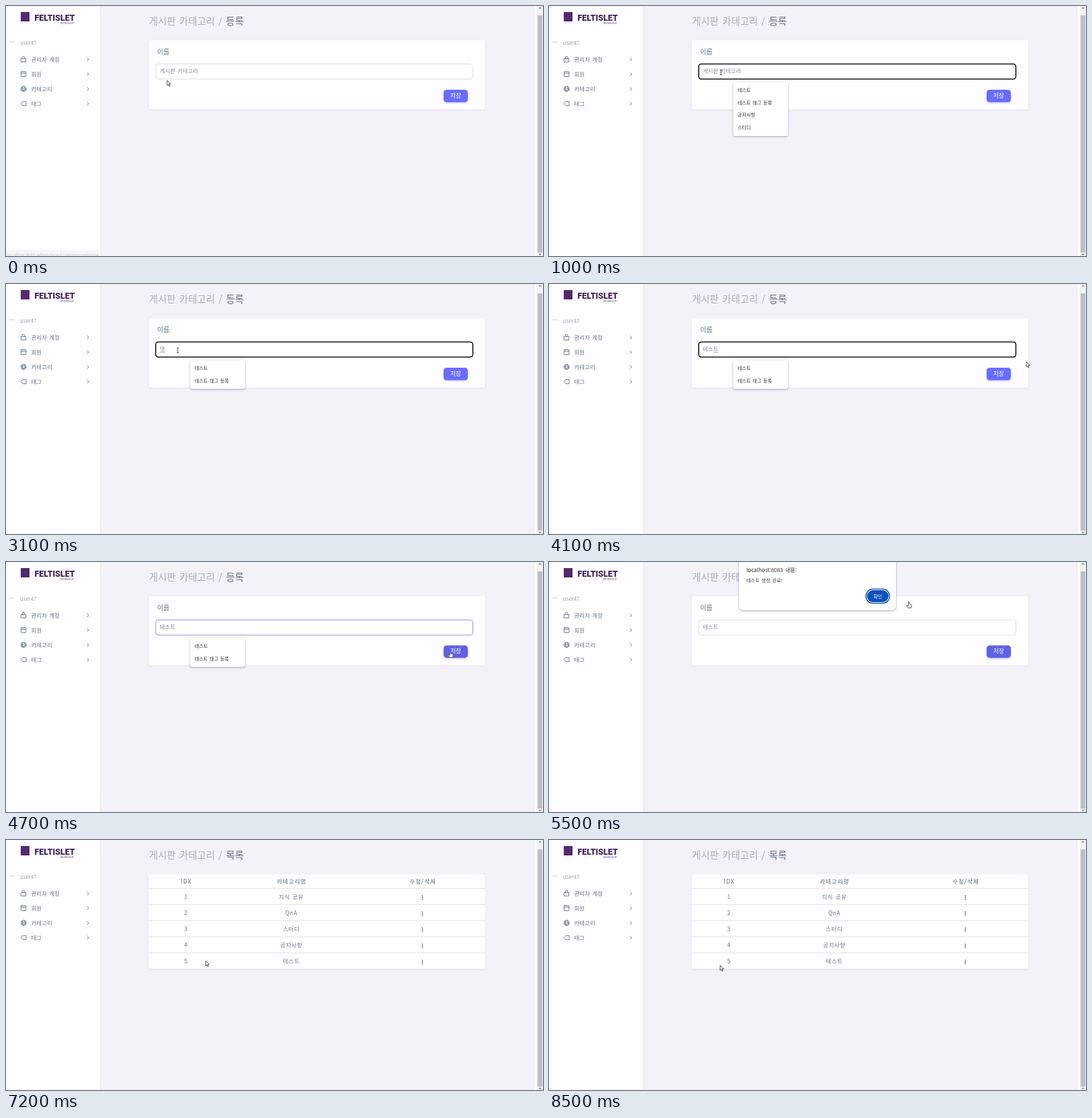
An HTML page for the animation above (8.7 s loop, 800x373 px).

```html
<!DOCTYPE html>
<html lang="ko">
<head>
<meta charset="utf-8">
<title>게시판 카테고리</title>
<style>
html, body { margin: 0; width: 100%; height: 100%; overflow: hidden; background: #f4f2f9; }
svg { display: block; width: 100%; height: 100%; }
text { font-family: "Noto Sans CJK KR", "Noto Sans CJK", "Noto Sans", sans-serif; word-spacing: .1em; white-space: pre; }
.latin { font-family: "Liberation Sans", Arial, sans-serif; }
.brand { font: 900 12.4px Roboto, sans-serif; }
.icon { fill: none; stroke: #697a8d; stroke-width: .95; stroke-linejoin: round; stroke-linecap: round; }
.head { letter-spacing: 1px; }
.cell { letter-spacing: .5px; }
.card { fill: #fefdff; filter: drop-shadow(0 1px 1.5px rgba(67, 60, 90, .1)); }
.popup { fill: #fff; filter: drop-shadow(0 1px 1.5px rgba(40, 40, 60, .4)); }
</style>
</head>
<body>
<svg id="stage" viewBox="0 0 800 373" preserveAspectRatio="none" xmlns="http://www.w3.org/2000/svg"></svg>
<script>
const LOOP = 8700, TICK = 100;
const stage = document.getElementById('stage');
const GREY = '#697a8d';

// Markup helpers; label() takes the vertical centre of the line.
const label = (x, cy, size, str, fill = GREY, extra = '') =>
  `<text x="${x}" y="${(cy + size * .36).toFixed(2)}" font-size="${size}" fill="${fill}" ${extra}>${str}</text>`;
const rect = (x, y, w, h, fill, r = 0, extra = '') =>
  `<rect x="${x}" y="${y}" width="${w}" height="${h}" rx="${r}" fill="${fill}" ${extra}/>`;
const group = (id, body) => `<g id="${id}">${body}</g>`;
const mid = cls => `text-anchor="middle" class="${cls}"`;

const menu = [
  ['관리자 계정', '<rect x="22.6" y="-1.2" width="7" height="5"/><path d="M24.2 -1.2V-2.6a1.9 1.9 0 0 1 3.8 0V-1.2"/>'],
  ['회원', '<rect x="22.4" y="-3.6" width="7.4" height="7.4" rx=".8"/><path d="M22.4 -1.4h7.4M24.2 -4.2v.6M28 -4.2v.6"/>'],
  ['카테고리', '<circle cx="26.1" cy="0" r="3.9"/><path d="M22.4 -1h5.2M25 -3.7l-1 5.4M24 1.5l5.6 .2M27.5 -3.5l1.5 5.4M27 3.6l-3 -2"/>'],
  ['태그', '<path d="M25 -3h5v6h-5l-2.6 -3z"/>']
];

function sidebar() {
  let out = rect(0, 0, 140, 373, '#fefdff') + rect(140, 0, 1.5, 373, '#ecebf2') +
    rect(2, 0, .7, 373, '#f3f2f5') + rect(4, 53, 9, 1, '#d3d5da') +
    rect(22, 9, 13, 14, '#552a6e') +
    '<text class="brand" x="42.5" y="22" fill="#41205c">FELTISLET</text>' +
    label(81, 26, 3.1, 'WORKSHOP', '#41205c', 'letter-spacing=".4"') +
    label(21, 55, 7.8, 'user47', '#9aa2ad');
  menu.forEach(([name, icon], i) => {
    const y = 79.7 + 22 * i;
    out += `<g class="icon" transform="translate(0 ${y})">${icon}<path d="M121 -2.2l2.3 2.2l-2.3 2.2"/></g>` +
      label(37.5, y, 8.5, name);
  });
  return out;
}

function scrollbar() {
  return rect(786, 0, 14, 373, '#faf9fc') + rect(786, 0, .8, 373, '#e7e6ec') +
    rect(791, 0, 9, 373, '#f3f2f5') + rect(792, 14, 7, 354, '#bfbec3') +
    '<path d="M793.5 3.8h4l-2 -2.6zM793.5 369.8h4l-2 2.4z" fill="#77767b"/>';
}

const title = word => label(213, 22.5, 14.4,
  `게시판 카테고리 / <tspan fill="#667080">${word}</tspan>`, '#a9adb6', 'font-weight="300"');

function form() {
  return title('등록') + rect(213, 51, 501, 103.5, '#fefdff', 3, 'class="card"') +
    label(225, 68, 10.2, '이름') +
    '<rect id="box" x="223" y="86.5" width="472.5" height="22.5" rx="4"/>' +
    label(229, 97, 8.4, '', GREY, 'id="value"') +
    '<path id="mark" d="M245 102h7" stroke="#697a8d" stroke-width=".6"/>' +
    rect(0, 93, .8, 9, '#444', 0, 'id="caret"') +
    group('save', rect(652, 125, 36, 18.5, '#696cff', 4.5,
      'id="saveBox" style="filter:drop-shadow(0 1px 1.5px rgba(105,108,255,.45))"') +
      label(670, 134, 8.6, '저장', '#fff', mid('')));
}

function list() {
  const cols = [268, 425, 620.5];
  const names = ['지식 공유', 'QnA', '스터디', '공지사항', '테스트'];
  let out = title('목록') + rect(212.5, 51, 501.5, 141, '#fefdff', 3, 'class="card"');
  ['IDX', '카테고리명', '수정/삭제'].forEach((h, i) => {
    out += label(cols[i] + .5, 62, 8.5, h, '#566a7f', mid('head'));
  });
  names.forEach((name, i) => {
    const y = 85 + 24 * i;
    out += rect(212.5, y - 13, 501.5, .9, '#e0e1e7') +
      label(cols[0], y, 8.5, i + 1, GREY, mid('cell')) +
      label(cols[1], y, 8.5, name, GREY, mid('cell'));
    for (const d of [-2.6, 0, 2.6]) out += `<circle cx="620.3" cy="${y + 1 + d}" r=".9" fill="#566a7f"/>`;
  });
  return out;
}

function hints() {
  const rows = ['테스트', '테스트 태그 등록', '공지사항', '스터디'];
  return rect(274.5, 114, 81.5, 42.5, '#fff', 3, 'class="popup" id="hintBox"') +
    rows.map((s, i) => label(281, 125.5 + 18.6 * i, 7.1, s, '#333', i > 1 ? 'class="more"' : '')).join('');
}

function dialog() {
  return rect(283, -12, 234, 84, '#fff', 7, 'class="popup"') +
    label(294, 12.3, 8.1, 'localhost:8083 내용:', '#333') +
    label(294, 27.8, 7.2, '테스트 생성 완료!', '#444') +
    rect(472, 40.3, 35.5, 21.4, '#fff', 10.7, 'id="ring" stroke="#0c4aa8" stroke-width="1.3"') +
    rect(473.7, 42, 32.2, 18, '#0f52b8', 9) +
    label(489.7, 51, 7.1, '확인', '#fff', mid(''));
}

const status = rect(0, 365.5, 138, 8, '#f6f5f8', 1, 'stroke="#e6e5ea" stroke-width=".6"') +
  label(2, 371.3, 6.1, 'localhost:8083/admin/board/category/register#', '#c3c5cc');

const cursors =
  group('arrow', '<path d="M0 0v7.6l1.8 -1.6l1.3 2.9l1.2 -.6l-1.3 -2.8h2.3z" fill="#fff" stroke="#333" stroke-width=".8"/>') +
  group('beam', '<path d="M-1.6 -3.6h3.2M-1.6 3.6h3.2M0 -3.6v7.2" fill="none" stroke="#444" stroke-width=".9"/>') +
  group('hand', '<path d="M-.8 -4.4q.8 -.9 1.5 0v3.2l2.4 .5q1.2 .3 1 1.6l-.7 3.6h-4.4l-2.3 -3.3q-.3 -1 .8 -.8l1.7 1.1z" fill="#fff" stroke="#333" stroke-width=".75"/>');

stage.innerHTML = sidebar() + group('form', form()) + group('list', list()) + scrollbar() +
  group('status', status) + group('hints', hints()) + group('dialog', dialog()) + group('cursor', cursors);

const $ = id => document.getElementById(id);
const show = (id, on) => $(id).setAttribute('display', on ? 'inline' : 'none');
const set = (id, attrs) => { for (const k in attrs) $(id).setAttribute(k, attrs[k]); };
const between = (t, a, b) => t >= a && t < b;
const ramp = (t, a, b) => Math.max(0, Math.min(1, (t - a) / (b - a)));
const latest = (keys, t) => keys.filter(k => k[0] <= t).pop();

const typed = [
  [0, ''], [1300, 'x'], [1400, 'xp'], [1500, 'xpt'], [1600, 'xptm'], [1700, 'xptmx'], [1800, 'xptmxm'],
  [2000, 'xptmx'], [2100, 'xptm'], [2600, 'xp'], [2700, ''], [2900, 'ㅌ'], [3000, '테'],
  [3100, '텟'], [3200, '테스'], [3300, '테슽'], [3400, '테스트']
];
const route = [
  [0, 240, 111], [100, 243, 107], [300, 256, 99], [3900, 256, 99], [4000, 520, 104], [4100, 711, 116],
  [4300, 716, 138], [4600, 662, 138], [4900, 662, 138], [5400, 536, 64], [5600, 536, 64],
  [5800, 490, 52], [6000, 484, 53], [6100, 480, 54], [6600, 484, 184], [7000, 195, 178],
  [7500, 486, 184], [7900, 207, 186], [8300, 252, 188], [8500, 255, 187], [8700, 255, 187]
];
const shapes = [[0, 'arrow'], [200, 'beam'], [4000, 'arrow'], [4500, 'hand'], [6000, 'arrow']];

function pointer(t) {
  const i = Math.max(1, route.findIndex(k => k[0] > t));
  const [t0, x0, y0] = route[i - 1], [t1, x1, y1] = route[i];
  const p = ramp(t, t0, t1), e = p * p * (3 - 2 * p);
  return [x0 + (x1 - x0) * e, y0 + (y1 - y0) * e];
}

function drawField(t) {
  const text = latest(typed, t)[1], latin = /^x/.test(text);
  const focus = between(t, 500, 4600), fading = between(t, 4600, 4900);
  set('box', {
    fill: '#fff',
    stroke: focus ? '#17171c' : fading ? '#9a95dc' : '#dcdfe6',
    'stroke-width': focus ? 1.6 : 1
  });
  const value = $('value');
  value.textContent = text || '게시판 카테고리';
  set('value', { class: latin ? 'latin' : '', 'font-size': latin ? 7.7 : 8.4, fill: text ? '#7c8896' : '#858d99' });
  const end = text ? 229 + value.getComputedTextLength() : 229;
  const lit = between(t, 600, 1000) || between(t, 1300, 2300) || between(t, 2600, 2900);
  set('caret', { x: end });
  show('caret', lit);
  const composing = between(t, 2900, 4600);
  show('mark', composing);
  if (composing) set('mark', { d: `M${end - 7.5} 102H${end}` });
}

function draw(t) {
  const listed = t >= 6000;
  show('form', !listed);
  show('list', listed);
  show('status', t < 300);
  if (!listed) drawField(t);

  const full = between(t, 600, 1300);
  show('hints', full || between(t, 3000, 4900));
  set('hintBox', { height: full ? 80 : 42.5 });
  for (const row of document.querySelectorAll('.more')) row.setAttribute('display', full ? 'inline' : 'none');

  const hover = t >= 4500;
  set('save', { transform: `translate(0 ${hover ? -.6 : 0})` });
  set('saveBox', { fill: hover ? '#5f61e6' : '#696cff' });

  const open = ramp(t, 4800, 5200), close = ramp(t, 5900, 6200);
  show('dialog', open > 0 && close < 1);
  set('dialog', {
    opacity: open * (1 - close),
    transform: `translate(0 ${-10 * (1 - open) - 10.5 * close})`
  });
  show('ring', t < 5900);

  const shape = latest(shapes, t)[1], [x, y] = pointer(t);
  for (const id of ['arrow', 'beam', 'hand']) show(id, id === shape);
  set('cursor', { transform: `translate(${x.toFixed(2)} ${y.toFixed(2)})` });
}

const start = performance.now();
function frame() {
  const t = (performance.now() - start) % LOOP;
  draw(Math.floor(t / TICK) * TICK);
  requestAnimationFrame(frame);
}
frame();
</script>
</body>
</html>
```
